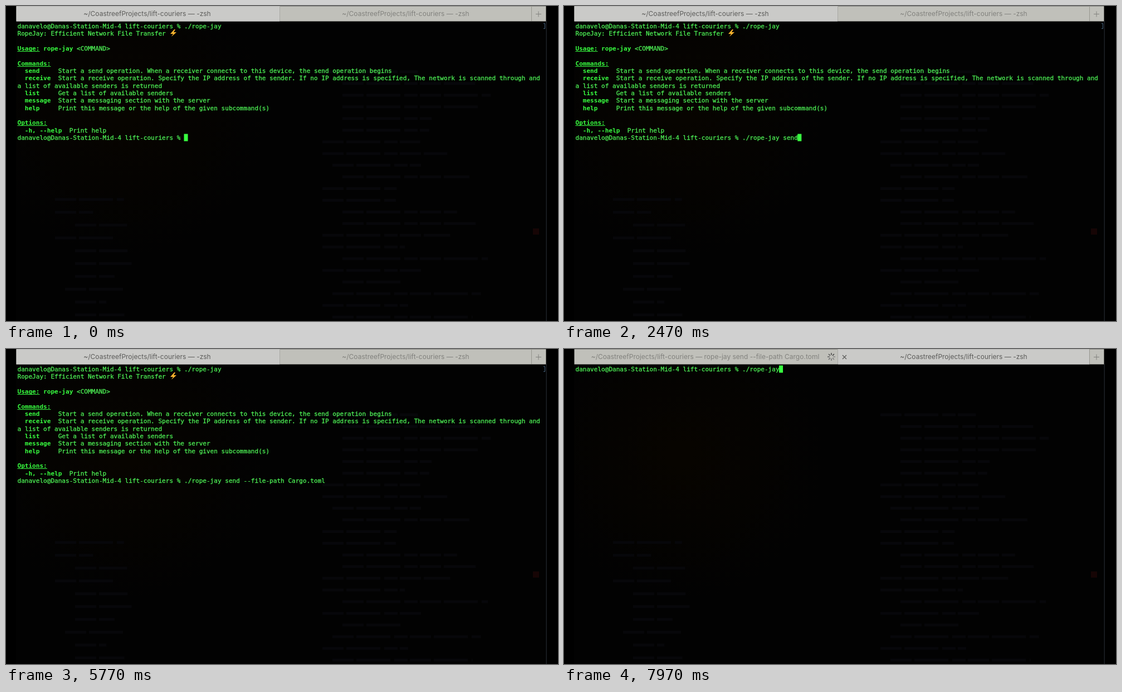
An HTML page with a canvas for the animation above (8 s loop, 991x565 px).

```html
<!DOCTYPE html>
<html lang="en">
<head>
<meta charset="utf-8">
<title>Terminal session</title>
<style>
  html, body { margin: 0; height: 100%; overflow: hidden; background: #000; }
  canvas { display: block; }
</style>
</head>
<body>
<canvas id="stage" width="991" height="565"></canvas>
<script>
const ctx = document.getElementById('stage').getContext('2d');
const LOOP = 8000, LEFT = 20.5, CHAR = 6.656, ROW = 13.33;
const GREEN = '#4df055', BRIGHT = '#38ff40';
const ACTIVE = '#cacac8', IDLE = '#c0c0ba', DARK = '#5c5c5a', MUTED = '#82827e';
const MONO = '11.05px "DejaVu Sans Mono", monospace';
const PROMPT = 'danavelo@Danas-Station-Mid-4 lift-couriers % ';
const TOOL = './rope-jay';
const COMMAND = TOOL + ' send --file-path Cargo.toml';
const FOLDER = '~/CoastreefProjects/lift-couriers — ';
const BLINK = 5700, ENTER = 5790, SWITCH = 6500;

// Each burst types its text evenly between two times
const FIRST_TYPING = [
  { text: TOOL, from: 600, to: 1410 },
  { text: ' send', from: 1900, to: 2440 },
  { text: ' ', from: 2670, to: 2670 },
  { text: '--file-path ', from: 2870, to: 4124 },
  { text: 'Ca', from: 4370, to: 4430 },
  { text: 'rgo', from: 4670, to: 4830 },
  { text: '.toml', from: 4970, to: 5370 }
];
const SECOND_TYPING = [{ text: TOOL, from: 7000, to: 7855 }];

const HELP = `
Usage: rope-jay <COMMAND>

Commands:
  send     Start a send operation. When a receiver connects to this device, the send operation begins
  receive  Start a receive operation. Specify the IP address of the sender. If no IP address is specified, The network is scanned through and
a list of available senders is returned
  list     Get a list of available senders
  message  Start a messaging section with the server
  help     Print this message or the help of the given subcommand(s)

Options:
  -h, --help  Print help`.split('\n');

const clamp = v => Math.max(0, Math.min(1, v));
const ease = v => v * v * (3 - 2 * v);

function rect(x, y, w, h, color) {
  ctx.fillStyle = color;
  ctx.fillRect(x, y, w, h);
}

function line(points, color, width = 1) {
  ctx.beginPath();
  points.forEach(([x, y]) => ctx.lineTo(x, y));
  ctx.strokeStyle = color;
  ctx.lineWidth = width;
  ctx.stroke();
}

// A thin outline gives the regular weight its soft screen-glow
function print(row, col, text, bold = false) {
  ctx.font = (bold ? 'bold ' : '') + MONO;
  ctx.textAlign = 'left';
  ctx.textBaseline = 'alphabetic';
  ctx.fillStyle = ctx.strokeStyle = bold ? BRIGHT : GREEN;
  ctx.lineWidth = 0.3;
  [...text].forEach((ch, i) => {
    const x = LEFT + (col + i) * CHAR, y = 40 + row * ROW;
    ctx.fillText(ch, x, y);
    if (!bold) ctx.strokeText(ch, x, y);
  });
}

function underline(row, length) {
  rect(LEFT, Math.round(41 + row * ROW), length * CHAR, 1, BRIGHT);
}

// Headings end in a colon; option names are indented and end at a double space
function helpLine(row, text) {
  const heading = text.match(/^\w+:/)?.[0] ?? '';
  const name = text.match(/^  \S.*?(?=  )/)?.[0] ?? (heading && text.split(' <')[0]);
  print(row, 0, name, true);
  print(row, name.length, text.slice(name.length));
  if (heading) underline(row, heading.length);
}

function typed(bursts, t) {
  return bursts.map(({ text, from, to }) => {
    const gap = (to - from) / Math.max(1, text.length - 1) || 1;
    return text.slice(0, Math.max(0, 1 + Math.floor((t - from) / gap)));
  }).join('');
}

function inputLine(row, text, cursor) {
  print(row, 0, PROMPT + text);
  if (cursor) rect(LEFT + (PROMPT.length + text.length) * CHAR - 0.5, 29.5 + row * ROW, 7, 13, BRIGHT);
}

// Blurred lines of code behind the translucent terminal
function ghostRows(x, top, step, widest, seed) {
  const random = () => (seed = seed * 16807 % 2147483647) / 2147483647;
  ctx.setLineDash([38, 5, 61, 7, 24, 4]);
  for (let y = top; y < 560; y += step) {
    const from = x + 18 * Math.floor(random() * 3);
    line([[from, y], [from + widest * (0.4 + 0.6 * random()), y]], '#07070a', 5);
  }
  ctx.setLineDash([]);
}

function backdrop() {
  rect(0, 0, 991, 565, '#000');
  rect(18, 27, 953, 538, '#020202');
  const glow = ctx.createRadialGradient(210, 190, 20, 210, 190, 260);
  glow.addColorStop(0, '#070400');
  glow.addColorStop(1, '#07040000');
  rect(18, 27, 480, 430, glow);
  ghostRows(568, 118, 20.95, 270, 41);
  ghostRows(88, 347, 23, 130, 7);
  rect(946, 399, 11, 11, '#160505');
  rect(969.5, 27, 1.5, 538, '#1d2026');
}

function tabTitle(text, x, color) {
  ctx.font = '12px Inter, sans-serif';
  ctx.textAlign = 'center';
  ctx.textBaseline = 'middle';
  ctx.fillStyle = color;
  ctx.fillText(text, x, 14.5);
}

function spinner(t) {
  const step = Math.floor(t / 100) % 8;
  for (let i = 0; i < 8; i++) {
    const a = i * Math.PI / 4, c = Math.cos(a), s = Math.sin(a);
    const shade = 70 + ((step - i + 8) % 8) * 10;
    line([[480 + 3 * c, 14 + 3 * s], [480 + 7 * c, 14 + 7 * s]], `rgb(${shade},${shade},${shade})`, 1.6);
  }
}

function tabs(t) {
  const second = t >= SWITCH, running = t >= ENTER, settled = t >= 6750;
  rect(18.5, 0.3, 951, 27.2, IDLE);
  if (!second) rect(18.5, 0.3, 472.5, 27.2, ACTIVE);
  if (settled) rect(492, 0.3, 451, 27.2, ACTIVE);
  line([[491.5, 0], [491.5, 27]], '#a9a9a5');
  line([[943.5, 0], [943.5, 27]], '#96968f');
  tabTitle(FOLDER + (running ? 'rope-jay send --file-path Cargo.toml' : '-zsh'), 253.5, second ? MUTED : DARK);
  tabTitle(FOLDER + '-zsh', 717.5, settled ? DARK : MUTED);
  line([[951, 14.5], [961, 14.5]], MUTED);
  line([[956, 9.5], [956, 19.5]], MUTED);
  if (running) spinner(t);
  if (second) {
    line([[500, 11], [507, 18]], DARK, 1.2);
    line([[507, 11], [500, 18]], DARK, 1.2);
  }
}

function helpScreen() {
  print(0, 0, PROMPT + TOOL);
  print(1, 0, 'RopeJay: Efficient Network File Transfer');
  ctx.fillStyle = '#ffb52e';
  ctx.fill(new Path2D('M302 42 L295 50 L300 50 L297 55 L306 47 L301 47 L304 42 Z'));
  HELP.forEach((text, i) => helpLine(i + 2, text));
  line([[965, 31.5], [967.5, 31.5], [967.5, 40.5], [965, 40.5]], '#46627c');
}

function pointer(t) {
  if (t < 6200 || t > 7000) return;
  const k = ease(clamp((t - 6200) / 260));
  const x = 750 + 59 * k, y = 110 - 99 * k;
  if (t >= 6480 && t < 6850) {
    ctx.beginPath();
    ctx.arc(x, y - 1, 20, 0, 7);
    ctx.strokeStyle = '#20201f';
    ctx.lineWidth = 1.3;
    ctx.stroke();
  }
  ctx.save();
  ctx.translate(x, y - 3);
  const arrow = new Path2D('M0 0 V13 L3 10.2 L5 15 L7.2 14 L5.2 9.4 H9.2 Z');
  ctx.fillStyle = '#000';
  ctx.strokeStyle = '#e8e8e4';
  ctx.lineWidth = 1;
  ctx.fill(arrow);
  ctx.stroke(arrow);
  ctx.restore();
}

function draw(t) {
  backdrop();
  if (t < SWITCH) {
    helpScreen();
    inputLine(15, typed(FIRST_TYPING, t), t < BLINK);
  } else {
    inputLine(0, typed(SECOND_TYPING, t), true);
  }
  tabs(t);
  pointer(t);
}

function tick() {
  draw(performance.now() % LOOP);
  requestAnimationFrame(tick);
}
tick();
</script>
</body>
</html>
```
